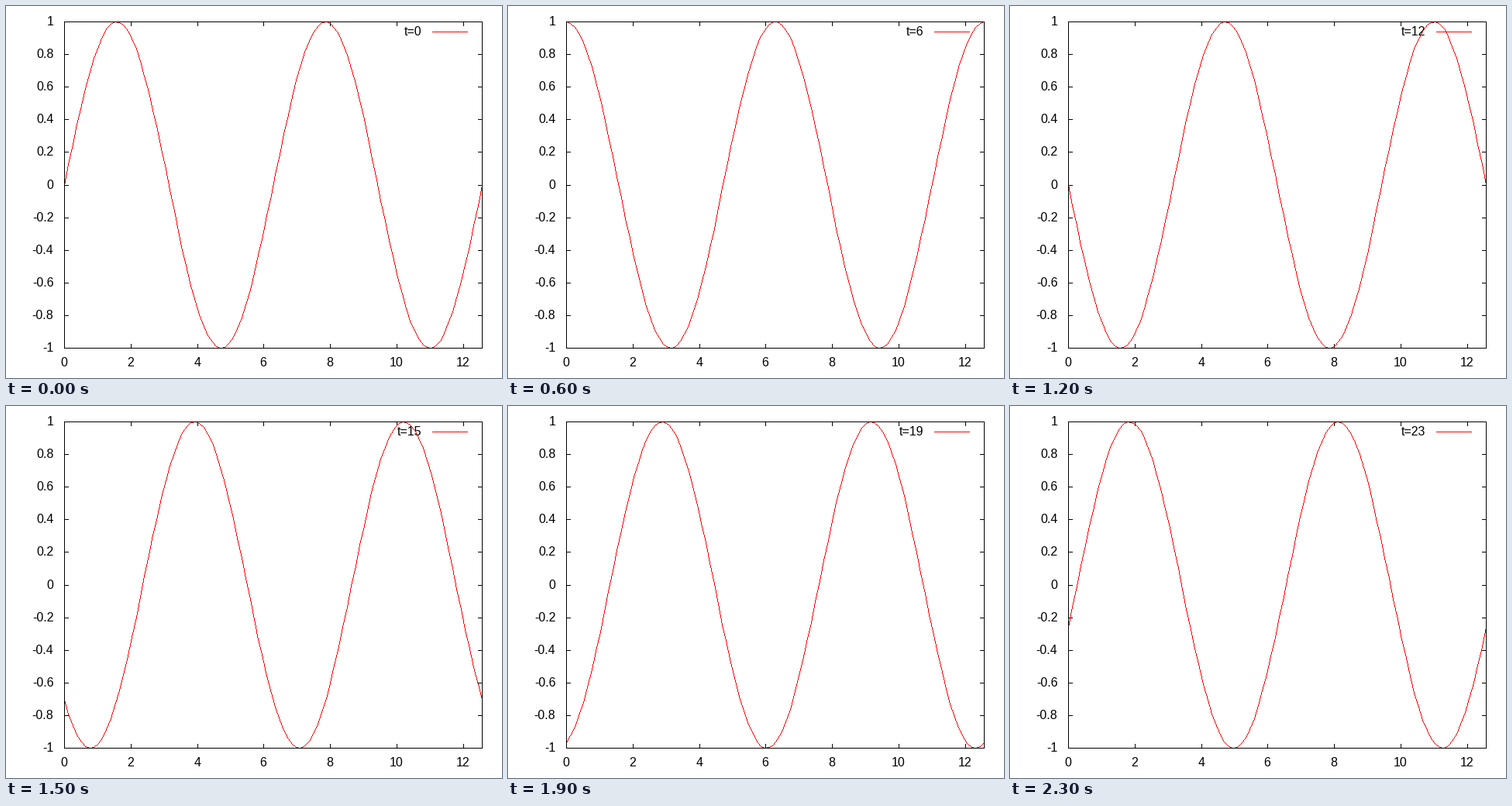
A matplotlib script that plays this animation: 640 by 480 pixels, repeating every 2400 ms.

```python
import numpy as np
import matplotlib.pyplot as plt
from matplotlib.animation import FuncAnimation

W, H = 640, 480
LEFT, RIGHT, TOP, BOTTOM = 75, 614, 20, 441
TICK = 5
FRAMES = 24
X_MAX = 4 * np.pi
BLACK = (0, 0, 0, 255)
RED = (255, 0, 0, 255)

plt.rcParams["font.family"] = "Liberation Sans"
plt.rcParams["font.size"] = 11.52  # 16 px at 100 dpi


def to_px(v):
    return np.floor(np.asarray(v) + 0.5).astype(int)


def map_x(x):
    return to_px(LEFT + x / X_MAX * (RIGHT - LEFT))


def map_y(y):
    return to_px(TOP + (1 - y) / 2 * (BOTTOM - TOP))


def line(img, x0, y0, x1, y1, color):
    """Draw a one-pixel line without antialiasing."""
    n = max(abs(x1 - x0), abs(y1 - y0)) + 1
    img[to_px(np.linspace(y0, y1, n)), to_px(np.linspace(x0, x1, n))] = color


def border(img):
    img[[TOP, BOTTOM], LEFT:RIGHT + 1] = BLACK
    img[TOP:BOTTOM + 1, [LEFT, RIGHT]] = BLACK


fig = plt.figure(figsize=(W / 100, H / 100), dpi=100, facecolor="white")
ax = fig.add_axes([0, 0, 1, 1])
ax.axis("off")

base = np.zeros((H, W, 4), np.uint8)
picture = ax.imshow(base, extent=(0, W, H, 0), interpolation="nearest",
                    aspect="auto", zorder=3)
ax.set_xlim(0, W)
ax.set_ylim(H, 0)


def label(x, y, text, ha):
    return ax.text(x, y, text, ha=ha, va="baseline", color="black", zorder=2)


for v in range(0, 13, 2):
    x = int(map_x(v))
    line(base, x, BOTTOM, x, BOTTOM - TICK, BLACK)
    line(base, x, TOP, x, TOP + TICK, BLACK)
    label(x, 465, str(v), "center")

for k in range(-5, 6):
    y = int(map_y(k / 5))
    line(base, LEFT, y, LEFT + TICK, y, BLACK)
    line(base, RIGHT, y, RIGHT - TICK, y, BLACK)
    label(61.4, y + 5, f"{k / 5:g}", "right")

line(base, 550, 33, 595, 33, RED)
key = label(536, 38, "t=0", "right")

xs = np.linspace(0, X_MAX, 100)
px = map_x(xs)


def update(t):
    img = base.copy()
    py = map_y(np.sin(xs + 2 * np.pi * t / FRAMES))
    for x0, y0, x1, y1 in zip(px, py, px[1:], py[1:]):
        line(img, x0, y0, x1, y1, RED)
    border(img)
    picture.set_data(img)
    key.set_text(f"t={t}")
    return picture, key


anim = FuncAnimation(fig, update, frames=FRAMES, interval=100,
                     repeat=True, repeat_delay=0, blit=False)
plt.show()
```
